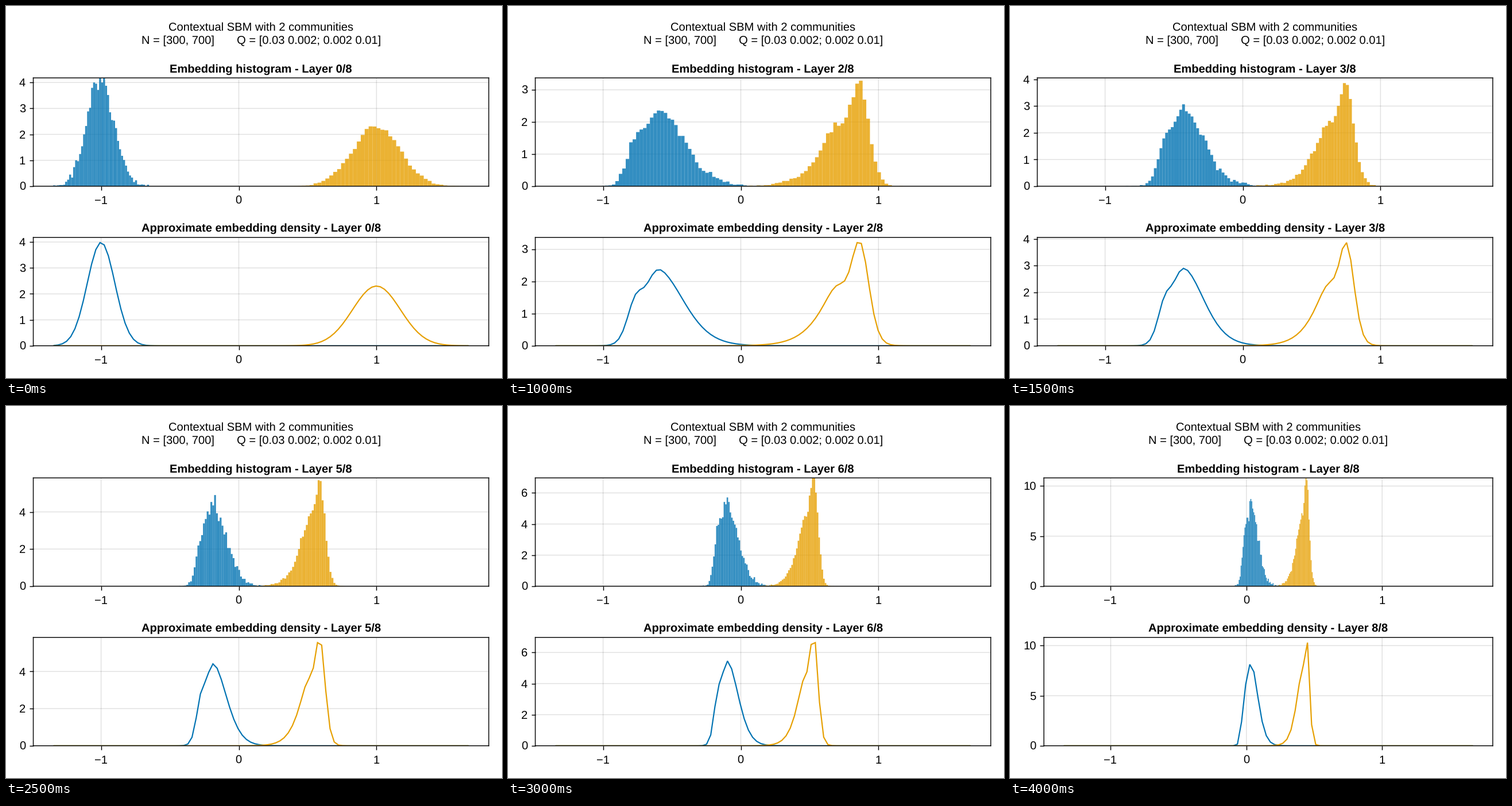
Write a matplotlib script that moves like this. It is 864 px wide and 648 px high and loops after 4.5 s.

```python
import math

import numpy as np
import matplotlib.pyplot as plt
from matplotlib.animation import FuncAnimation

W, H = 864, 648
LAYERS = 8
PX = 1.44                       # pixels per layout unit
COLORS = ("#0072B2", "#E69F00")

# Contextual stochastic block model
SIZES = (300, 700)
Q = ((0.03, 0.002), (0.002, 0.01))
MEANS, VARS = (-1.0, 1.0), (0.01, 0.03)
GRID = np.linspace(-1.342, 1.665, 100)
XLIM = (-1.4924, 1.8153)

BIN_SD = (0.145, 0.165)         # bin width in standard deviations
DRAWS = 20                      # sampled graphs behind each histogram

plt.rcParams.update({
    "font.family": "Liberation Sans",
    "font.size": 14 * PX,
    "text.hinting": "none",
    "path.snap": False,
    "axes.linewidth": PX,
})


def binomial(n, p, count):
    return np.array([math.comb(n, k) * p**k * (1 - p)**(n - k)
                     for k in range(count)])


def aggregate(c, means, variances):
    """Gaussian mixture after averaging a node with its random neighbours."""
    o = 1 - c
    own = binomial(SIZES[c] - 1, Q[c][c], 40)
    other = binomial(SIZES[o], Q[c][o], 14)
    a, b = np.meshgrid(np.arange(1, 41), np.arange(14), indexing="ij")
    n = a + b
    mu = (a * means[c] + b * means[o]) / n
    sd = np.sqrt(a * variances[c] + b * variances[o]) / n
    return np.outer(own, other).ravel(), mu.ravel(), sd.ravel()


def moments(mix):
    w, mu, sd = mix
    mean = (w * mu).sum()
    return mean, (w * (sd**2 + mu**2)).sum() - mean**2


def density(mix, x):
    w, mu, sd = mix
    z = (x[:, None] - mu) / sd
    return (w / sd * np.exp(-z**2 / 2)).sum(axis=1) / math.sqrt(2 * math.pi)


def build_layers():
    layers = [[(np.array([1.0]), np.array([m]), np.array([math.sqrt(v)]))
               for m, v in zip(MEANS, VARS)]]
    for _ in range(LAYERS):
        means, variances = zip(*(moments(mix) for mix in layers[-1]))
        layers.append([aggregate(c, means, variances) for c in (0, 1)])
    return layers


def histogram(layer, c):
    """Bin the density, with the counting noise of a finite sample."""
    mix = MIXES[layer][c]
    mean, var = moments(mix)
    step = BIN_SD[c] * math.sqrt(var)
    left = mean + step * np.arange(-60, 60)
    fine = left[:, None] + step * (np.arange(5) + 0.5) / 5
    level = density(mix, fine.ravel()).reshape(fine.shape).mean(axis=1)
    n = DRAWS * SIZES[c] * step
    h = np.random.default_rng(10 * layer + c).poisson(level * n) / n
    keep = h > 0
    return left[keep], h[keep], step


MIXES = build_layers()
CURVES = [[density(mix, GRID) for mix in pair] for pair in MIXES]
HISTS = [[histogram(k, c) for c in (0, 1)] for k in range(LAYERS + 1)]

fig = plt.figure(figsize=(W / 72, H / 72), dpi=72, facecolor="white")


def put(x, y, text, **kw):
    fig.text(x / W, 1 - y / H, text, ha="center", va="baseline", **kw)


def panel(left, top, ymax, title):
    right, height = 584 * PX, 131 * PX
    bottom = top + height
    ax = fig.add_axes([left / W, 1 - bottom / H, (right - left) / W, height / H])
    lo, hi = XLIM
    ax.set_xlim(lo, hi)
    ax.set_ylim(0, ymax)
    ax.set_axisbelow(True)
    ax.grid(color="black", alpha=0.12, linewidth=PX)
    ax.tick_params(length=5 * PX, width=PX, labelbottom=False, labelleft=False)

    step = 1 if ymax < 5 else 2 if ymax < 10 else 5
    yticks = np.arange(0, ymax, step)
    ax.set_xticks([-1, 0, 1])
    ax.set_yticks(yticks)
    for v in (-1, 0, 1):
        x = left + (v - lo) / (hi - lo) * (right - left)
        put(x - 0.5, bottom + 31, str(v).replace("-", "\u2212"))
    for v in yticks:
        label = f"{v:.0f}"
        put(left - 13.4 - 5.6 * len(label), bottom - v / ymax * height + 7.2, label)
    put((left + right) / 2, top - 10, title, weight="bold")
    return ax


def draw(layer):
    fig.clear()
    curves = CURVES[layer]
    ymax = 1.05 * max(y.max() for y in curves)
    left = (41 if ymax > 10 else 33) * PX
    mid = left / 2 + 292 * PX
    put(mid, 42.4, "Contextual SBM with 2 communities")
    put(mid, 66.3, "N = [300, 700]       Q = [0.03 0.002; 0.002 0.01]")

    tag = f" - Layer {layer}/{LAYERS}"
    bars = panel(left, 87 * PX, ymax, "Embedding histogram" + tag)
    lines = panel(left, 280 * PX, ymax, "Approximate embedding density" + tag)
    for c, color in enumerate(COLORS):
        x, h, width = HISTS[layer][c]
        bars.bar(x, h, width, align="edge", color=color, alpha=0.8, linewidth=0)
        lines.plot(GRID, curves[c], color=color, linewidth=1.5 * PX,
                   solid_joinstyle="miter")
    return []


anim = FuncAnimation(fig, draw, frames=LAYERS + 1, init_func=lambda: draw(0),
                     interval=500, repeat=True, repeat_delay=0)
plt.show()
```
